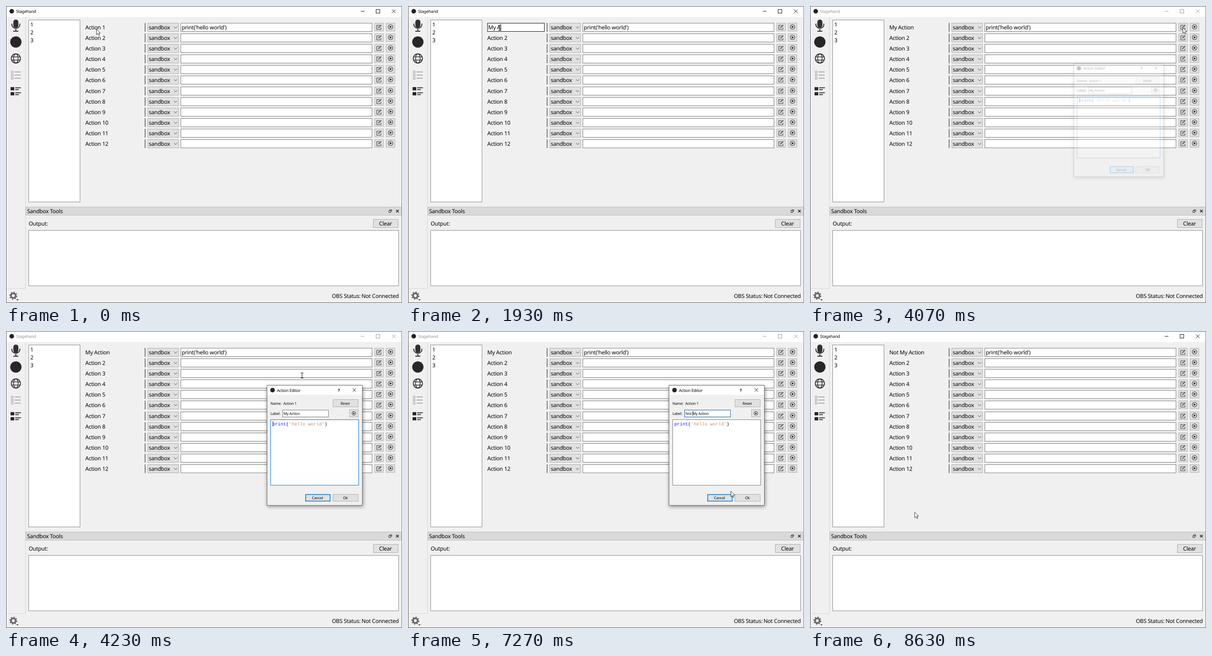
An HTML page that plays this animation: 864x648 px, repeating every 9.33 s.

```html
<!DOCTYPE html>
<html lang="en">
<head>
<meta charset="utf-8">
<title>Action editor</title>
<style>
html, body { margin: 0; width: 100%; height: 100%; overflow: hidden; background: #f0f0f0; }
svg { display: block; width: 100vw; height: 100vh; }
text { font-family: "Noto Sans", "Open Sans", sans-serif; white-space: pre; text-rendering: geometricPrecision; }
.ui { font-size: 12px; letter-spacing: -.25px; }
.title { font-size: 9px; letter-spacing: -.22px; }
.small { font-size: 8px; letter-spacing: -.19px; }
.code { font: 10px "Liberation Mono", monospace; }
.mid { text-anchor: middle; }
.end { text-anchor: end; }
</style>
</head>
<body>
<svg id="stage" viewBox="0 0 864 648" xmlns="http://www.w3.org/2000/svg"></svg>
<script>
const LOOP = 9330, ROWS = 12;

const box = (x, y, r, b, fill, stroke, extra = '') =>
  `<rect x="${x + .5}" y="${y + .5}" width="${r - x - 1}" height="${b - y - 1}" fill="${fill}" stroke="${stroke}" ${extra}/>`;
const fill = (x, y, w, h, color) => `<rect x="${x}" y="${y}" width="${w}" height="${h}" fill="${color}"/>`;
const text = (x, y, str, cls = 'ui', extra = '') => `<text x="${x}" y="${y}" class="${cls}" ${extra}>${str}</text>`;
const line = (d, color = '#333', width = 1, extra = '') =>
  `<path d="${d}" fill="none" stroke="${color}" stroke-width="${width}" ${extra}/>`;
const dot = (x, y, r, color) => `<circle cx="${x}" cy="${y}" r="${r}" fill="${color}"/>`;
const ring = (x, y, r, color, width, extra = '') =>
  `<circle cx="${x}" cy="${y}" r="${r}" fill="none" stroke="${color}" stroke-width="${width}" ${extra}/>`;
const button = (x, y, r, b, extra) => box(x, y, r, b, '#e1e1e1', '#adadad', extra);
const cross = (x, y, r, width = 1) =>
  line(`M${x - r} ${y - r}L${x + r} ${y + r}M${x - r} ${y + r}L${x + r} ${y - r}`, '#111', width);
const play = (x, y, r) => ring(x, y, r, '#333', 1.1) +
  `<path d="M${x - r * .35} ${y - r * .55}L${x + r * .6} ${y}L${x - r * .35} ${y + r * .55}Z" fill="#222"/>`;
const pencil = (x, y) =>
  line(`M${x + 1} ${y - 4}H${x - 5}V${y + 5}H${x + 4}V${y + 1}`, '#333', 1.1) +
  line(`M${x - 1.5} ${y + 1.5}L${x + 4.5} ${y - 4.5}`, '#333', 2.4) +
  line(`M${x - 1.2} ${y + 1.2}L${x + 3.6} ${y - 3.6}`, '#e1e1e1', .7);

const rowTop = i => Math.floor(37 + 23.18 * i);

function row(i) {
  const y = rowTop(i);
  return text(173, y + 14, `Action ${i + 1}`, 'ui', `id="label${i}"`) +
    fill(303, y, 1, 19, '#111') +
    button(309, y, 377, y + 19) + text(311.5, y + 14, 'sandbox') +
    line(`M366.5 ${y + 8}L370 ${y + 11.3}L373.5 ${y + 8}`, '#444') +
    box(381, y, 799, y + 19, '#fff', '#7a7a7a', `id="field${i}"`) +
    button(804, y, 824, y + 18, i ? '' : 'id="editBtn"') + pencil(814, y + 9) +
    button(829, y, 849, y + 18) + play(839, y + 8.5, 5);
}

function sidebar() {
  let s = '<rect x="16" y="29.5" width="11" height="18" rx="5.5" fill="#303030"/>' +
    line('M12.8 38.5V41.5A8.8 8.2 0 0 0 30.2 41.5V38.5M21.5 50V54.5M16 55H27', '#303030', 2) +
    dot(21.5, 78.5, 12.3, '#272727') +
    ring(21.5, 114.5, 10, '#303030', 1.8) +
    line('M12 111H31M12 118H31', '#303030', 1.6) +
    '<ellipse cx="21.5" cy="114.5" rx="5" ry="10" fill="none" stroke="#303030" stroke-width="1.6"/>';
  for (let i = 0; i < 3; i++) {
    const y = 143.5 + i * 6.8;
    s += box(11, y - 2, 16, y + 3, 'none', '#999') + fill(18.5, y - .5, 13.5, 1.6, '#999');
  }
  for (const y of [177, 188])
    s += fill(10, y, 8, 7, '#272727') + fill(20, y + .5, 12.5, 1.8, '#272727') + fill(20, y + 4.5, 8, 1.8, '#272727');
  return s;
}

const main = fill(0, 0, 864, 648, '#f0f0f0') + fill(0, 0, 864, 24, '#fff') +
  dot(12.5, 11.5, 5, '#222') +
  `<g id="titleBar">${text(22, 15, 'Stagehand', 'title')}` +
  line('M774 11.5H782', '#111') + box(807, 7, 816, 16, 'none', '#111') + cross(846, 11.5, 4) + '</g>' +
  fill(42, 24, 1, 593, '#d5d5d5') + sidebar() +
  box(49, 30, 162, 428, '#fff', '#828790') +
  [1, 2, 3].map(n => text(53, 28 + 17.1 * n, n)).join('') +
  Array.from({ length: ROWS }, (_, i) => row(i)).join('') +
  box(43, 438, 865, 457, '#d9d9d9', '#bdbdbd') + text(46, 452, 'Sandbox Tools') +
  box(837, 444, 842, 448, 'none', '#333') + box(835, 446, 840, 451, '#d9d9d9', '#333') + cross(854, 447.5, 2.8, 1.3) +
  text(49.5, 479, 'Output:') + button(801, 465, 856, 484) + text(828, 479, 'Clear', 'ui mid') +
  box(49, 489, 857, 611, '#fff', '#828790') +
  fill(0, 616, 43, 1, '#d5d5d5') +
  ring(16, 632, 5, '#666', 3.6) + ring(16, 632, 7.5, '#666', 2.4, 'stroke-dasharray="2.945"') +
  '<path d="M22.5 640H27.5L25 642.6Z" fill="#222"/>' +
  text(711, 637, 'OBS Status:') + text(857, 637, 'Not Connected', 'ui end') +
  fill(0, 0, 864, 1, '#565b60') + fill(0, 0, 1, 648, '#555') + fill(863, 0, 1, 648, '#777') + fill(0, 647, 864, 1, '#555');

const inline = '<g id="inline">' + box(173, 37, 298, 56, '#fff', '#111') +
  '<rect id="inlineSel" x="175" y="39" width="44" height="14" fill="#0078d7"/>' +
  text(175, 51, '', 'ui', 'id="inlineText"') +
  '<rect id="inlineCaret" y="39" width="1" height="14"/></g>';

const dialog = '<g id="dialog">' +
  '<rect x="570" y="121" width="209" height="262" filter="url(#shadow)" opacity=".45"/>' +
  box(569, 118, 778, 381, '#f0f0f0', '#666') + fill(570, 119, 207, 20, '#fff') +
  dot(581.5, 129, 5, '#222') + text(591, 132.5, 'Action Editor', 'title') +
  text(726, 133, '?', 'title mid', 'font-weight="600"') + cross(760, 128.5, 3.7) +
  text(577, 160.5, 'Name:', 'small') + text(605, 160.5, 'Action 1', 'small') +
  button(713, 149, 769, 166) + text(740, 160.5, 'Reset', 'small mid') +
  text(577, 183, 'Label:', 'small') +
  box(603, 172, 704, 188, '#fff', '#7a7a7a', 'id="nameField"') +
  text(605.5, 183, '', 'small', 'id="nameText"') +
  '<rect id="nameCaret" y="175" width="1" height="10"/>' +
  button(749, 171, 769, 188) + play(759, 179.5, 4) +
  box(577, 193, 770, 337, '#fff', '#7a7a7a', 'id="codeField"') +
  text(581, 206, '<tspan fill="#1a1aff">print</tspan>(<tspan fill="#d18b5f">\'hello world\'</tspan>)', 'code') +
  '<rect id="codeCaret" x="582" y="197" width="1" height="11"/>' +
  '<rect x="653.75" y="356.75" width="53.5" height="14.5" fill="#e1e1e1" stroke="#0078d7" stroke-width="1.5"/>' +
  text(679.5, 367, 'Cancel', 'small mid') +
  button(713, 356, 769, 372, 'id="okBtn"') + text(740.5, 367, 'Ok', 'small mid') + '</g>';

const cursors = '<path id="arrow" d="M.5 .5V12.5L3.3 9.9L5.2 14.2L7.2 13.3L5.3 9.1H9Z" fill="#fff" stroke="#222" stroke-width=".9"/>' +
  line('M-3 -5.5H-.8L0 -4.8L.8 -5.5H3M0 -4.8V4.8M-3 5.5H-.8L0 4.8L.8 5.5H3', '#111', 1.1, 'id="beam"');

document.getElementById('stage').innerHTML =
  '<defs><filter id="shadow" x="-10%" y="-10%" width="120%" height="120%"><feGaussianBlur stdDeviation="4.5"/></filter></defs>' +
  main + text(383.5, 51, "print('hello world')") + inline + dialog + cursors;

const el = {};
document.querySelectorAll('[id]').forEach(node => el[node.id] = node);
const set = (id, name, value) => el[id].setAttribute(name, value);
const show = (id, on) => set(id, 'visibility', on ? 'inherit' : 'hidden');
const write = (id, str) => { if (el[id].textContent !== str) el[id].textContent = str; };
const clamp = v => Math.max(0, Math.min(1, v));
const inside = (p, x, y, r, b) => p.x >= x && p.x < r && p.y >= y && p.y < b;

// time, x, y
const path = [
  [0, 197, 50], [30, 197, 48.5], [70, 197, 47], [270, 197, 47], [500, 199.5, 47.5],
  [3100, 199.5, 47.5], [3200, 330, 60], [3370, 717, 79], [3490, 808, 87], [3580, 826, 80], [3800, 815, 50], [3900, 814, 47],
  [4070, 814, 47], [4230, 646, 97], [4420, 641, 160], [4650, 654, 179],
  [7070, 654, 179], [7160, 668, 240], [7270, 704, 349], [7420, 733, 363], [8050, 735, 363],
  [8240, 470, 392], [8430, 227, 397], [8580, 227, 397], [8630, 228, 395], [LOOP, 228, 395]
];
// time, text, caret index
const inlineKeys = [
  [300, 'Action 1', 8], [1070, 'Action 1', 8], [1300, 'M', 1], [1570, 'My', 2], [1730, 'My ', 3], [1930, 'My A', 4],
  [2000, 'My Ac', 5], [2170, 'My Act', 6], [2250, 'My Acti', 7], [2330, 'My Actio', 8], [2470, 'My Action', 9]
];
const nameKeys = [
  [4070, 'My Action', -1], [4830, 'My Action', 9], [5570, 'My Action', 0], [6100, 'NMy Action', 1],
  [6270, 'NoMy Action', 2], [6330, 'NotMy Action', 3], [6670, 'Not My Action', 4]
];

function pointer(t) {
  const i = path.findIndex(k => k[0] > t);
  const [t0, x0, y0] = path[i - 1], [t1, x1, y1] = path[i];
  const u = (t - t0) / (t1 - t0);
  return { x: x0 + (x1 - x0) * u, y: y0 + (y1 - y0) * u };
}

function typed(t, keys, textId, caretId, blink) {
  const [at, str, index] = keys.filter(k => k[0] <= t).pop() || keys[0];
  const node = el[textId];
  write(textId, str);
  const left = +node.getAttribute('x') + (index > 0 ? node.getSubStringLength(0, index) : 0);
  set(caretId, 'x', Math.round(left));
  show(caretId, index >= 0 && Math.floor((t - at) / blink) % 2 === 0);
}

function draw(t) {
  const p = pointer(t);
  const editing = t >= 300 && t < 2630;
  const open = t >= 4070 && t < 8120;
  const modal = t >= 4070 && t < 8000;
  const overDialog = modal && inside(p, 569, 118, 778, 381);
  const overName = overDialog && inside(p, 603, 172, 704, 188);
  const overCode = overDialog && inside(p, 577, 193, 770, 337);
  let beam = overName || overCode || (t >= 400 && t < 2670);

  for (let i = 0; i < ROWS; i++) {
    const over = !overDialog && inside(p, 381, rowTop(i), 799, rowTop(i) + 19);
    beam = beam || over;
    set('field' + i, 'stroke', over && !modal ? '#171717' : '#7a7a7a');
  }

  const hover = (id, on) => {
    set(id, 'fill', on ? '#e5f1fb' : '#e1e1e1');
    set(id, 'stroke', on ? '#0078d7' : '#adadad');
  };
  hover('editBtn', !modal && inside(p, 804, 37, 824, 55));
  hover('okBtn', overDialog && inside(p, 713, 356, 769, 372));

  write('label0', t < 2630 ? 'Action 1' : t < 8000 ? 'My Action' : 'Not My Action');
  show('label0', !editing);
  set('titleBar', 'opacity', modal ? .42 : 1);

  show('inline', editing);
  const selected = t >= 1070 && t < 1300;
  show('inlineSel', selected);
  if (editing) {
    typed(t, inlineKeys, 'inlineText', 'inlineCaret', 530);
    set('inlineText', 'fill', selected ? '#fff' : '#000');
  } else show('inlineCaret', false);

  show('dialog', open);
  if (open) {
    const enter = 1 - (1 - clamp((t - 4050) / 220)) ** 3;
    const leave = clamp((t - 7980) / 140);
    const scale = .92 + .08 * enter - .07 * leave;
    set('dialog', 'transform', `translate(673.5 249.5) scale(${scale}) translate(-673.5 -249.5)`);
    set('dialog', 'opacity', enter * (1 - leave));
    typed(t, nameKeys, 'nameText', 'nameCaret', t < 6670 ? 540 : 640);
    const focused = t >= 4830;
    set('nameField', 'stroke', overName ? '#111' : focused ? '#1a5c8e' : '#7a7a7a');
    set('codeField', 'stroke', focused ? (overCode ? '#171717' : '#7a7a7a') : '#0078d7');
    show('codeCaret', !focused && t < 4630);
  }

  show('beam', beam);
  show('arrow', !beam);
  set(beam ? 'beam' : 'arrow', 'transform', `translate(${Math.round(p.x)} ${Math.round(p.y)})`);
}

const start = performance.now();
function tick() {
  draw((performance.now() - start) % LOOP);
  requestAnimationFrame(tick);
}
tick();
</script>
</body>
</html>
```
